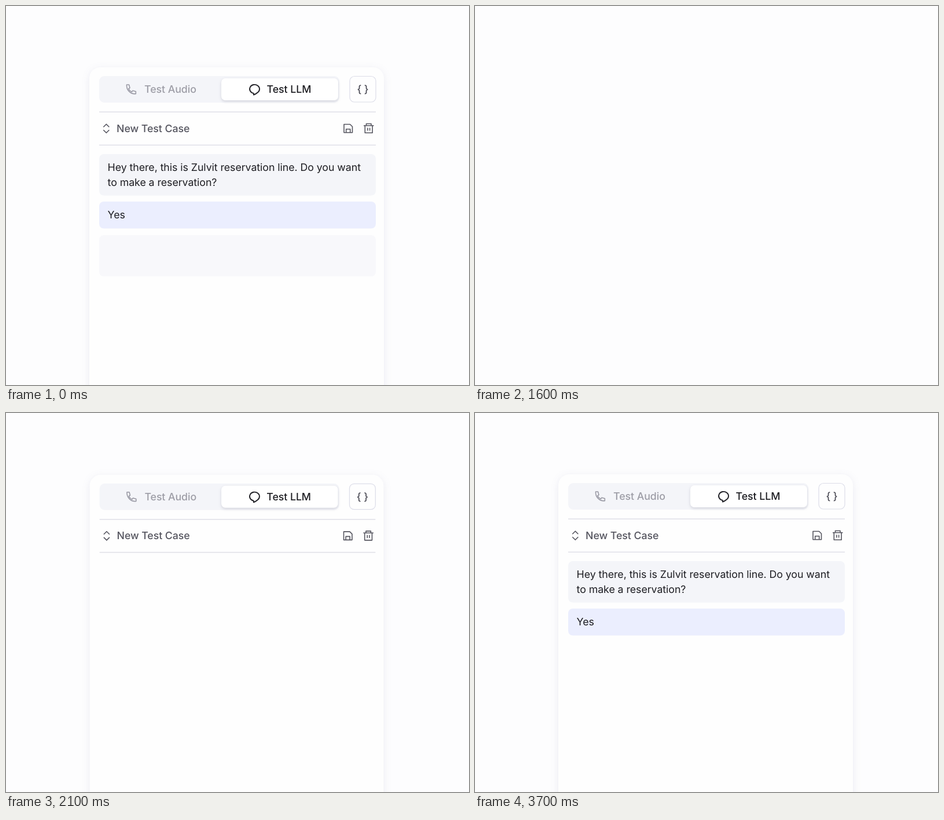
These frames come from a looping animation (800 by 655 pixels, 4000 ms). An HTML page:

```html
<!DOCTYPE html>
<html lang="en">
<head>
<meta charset="utf-8">
<style>
  html, body { margin: 0; width: 100%; height: 100%; overflow: hidden; background: #fdfdfe; }
  svg { display: block; }
  text { font: 17.8px Inter, sans-serif; letter-spacing: -.004em; fill: #1d1d22; text-rendering: geometricPrecision; }
  .medium { font-weight: 500; }
  .panel { fill: #fefefe; filter: drop-shadow(0 3px 7px rgba(60, 60, 120, .09)); }
  .active { fill: #fff; filter: drop-shadow(.5px 2.5px 2.5px rgba(40, 40, 70, .16)); }
  .icon { fill: none; stroke: #55555f; stroke-width: 1.6; stroke-linejoin: round; }
</style>
</head>
<body>
<svg width="800" height="655" viewBox="0 0 800 655">
  <g id="card">
    <rect class="panel" x="144" y="106" width="509" height="648" rx="19"/>

    <rect x="161" y="121" width="415" height="46" rx="9" fill="#f4f5f9"/>
    <rect class="active" x="372" y="125" width="202" height="38" rx="7"/>
    <path class="icon" style="stroke:#9a9aa5" transform="translate(207 135)"
      d="M1.5 1H5.5L7 6.5 4.8 8A10 10 0 0 0 10.5 13.4L12 11.2 17.3 12.8V16.8C8 17.6.8 10 1.5 1Z"/>
    <text class="medium" x="239" y="150.4" style="fill:#9d9da6">Test Audio</text>
    <path class="icon" style="stroke:#222228;stroke-width:1.9"
      d="M427.8 150.9A8.5 7.6 0 1 1 434.4 149.7Q431.5 152.3 427.9 153.5Z"/>
    <text class="medium" x="450.5" y="150.4">Test LLM</text>
    <rect x="594" y="121.5" width="45" height="44.5" rx="8" fill="#fefefe" stroke="#dcdde8" stroke-width="1.2"/>
    <text class="medium" x="616.5" y="150" text-anchor="middle" style="fill:#4b4b55">{ }</text>

    <path d="M161 183.2H639M161 240.3H639" stroke="#dadae4" stroke-width="1.3"/>
    <path class="icon" d="M168.3 209.2l5-5 5 5M168.3 214.3l5 5 5-5"/>
    <text class="medium" x="191" y="217.9" style="fill:#55555f">New Test Case</text>
    <path class="icon" d="M584 204.5h10.5l4 4v10.3H584zM587.7 218.5v-5.7h7v5.7"/>
    <path class="icon" d="M618 206.7h17.5M622.5 206.5v-3h8.5v3M620.3 206.7v12.6h12.8v-12.6M624.9 210.5v5M628.6 210.5v5"/>
  </g>
</svg>
<script>
const LOOP = 4000, STEP = 100, PHASE = 2400; // the card pops in 1600 ms after load
const card = document.getElementById('card');

function add(parent, tag, attrs) {
  const el = document.createElementNS('http://www.w3.org/2000/svg', tag);
  for (const key in attrs) el.setAttribute(key, attrs[key]);
  return parent.appendChild(el);
}

// Times are measured from the moment the card pops in.
const messages = [
  { y: 256, h: 71.5, fill: '#f4f5f9', fadeAt: 610, fade: 350, typeAt: 700, perWord: 55,
    lines: ['Hey there, this is Zulvit reservation line. Do you want', 'to make a reservation?'] },
  { y: 338, h: 46.5, fill: '#ebeefe', fadeAt: 1800, fade: 300, typeAt: 1800, perWord: 1,
    lines: ['Yes'] },
  { y: 396, h: 71.5, fill: '#f4f5f9', fadeAt: 2290, fade: 200, typeAt: 2560, perWord: 38,
    lines: ["Great, could you please tell me the date you'd like to", 'make the reservation for?'] }
];

for (const m of messages) {
  m.group = add(card, 'g', {});
  add(m.group, 'rect', { x: 161, y: m.y, width: 478, height: m.h, rx: 8, fill: m.fill });
  m.lines = m.lines.map((line, i) => ({
    words: line.split(' '),
    el: add(m.group, 'text', { x: 175.6, y: m.y + 29.3 + i * 25.4 })
  }));
}

const clamp = v => Math.max(0, Math.min(1, v));

function draw() {
  const now = Math.floor(performance.now() / STEP) * STEP;
  const t = (now + PHASE) % LOOP;

  // Cubic ease-out, settling after 600 ms
  const scale = 1 - .57 * clamp(1 - t / 600) ** 3;
  card.setAttribute('transform', `translate(398.5 430) scale(${scale}) translate(-398.5 -430)`);
  card.setAttribute('opacity', clamp(t / 100));

  for (const m of messages) {
    m.group.setAttribute('opacity', clamp((t - m.fadeAt) / m.fade));
    let count = Math.max(0, 1 + Math.floor((t - m.typeAt) / m.perWord));
    for (const { words, el } of m.lines) {
      el.textContent = words.slice(0, count).join(' ');
      count = Math.max(0, count - words.length);
    }
  }
  requestAnimationFrame(draw);
}
draw();
</script>
</body>
</html>
```
